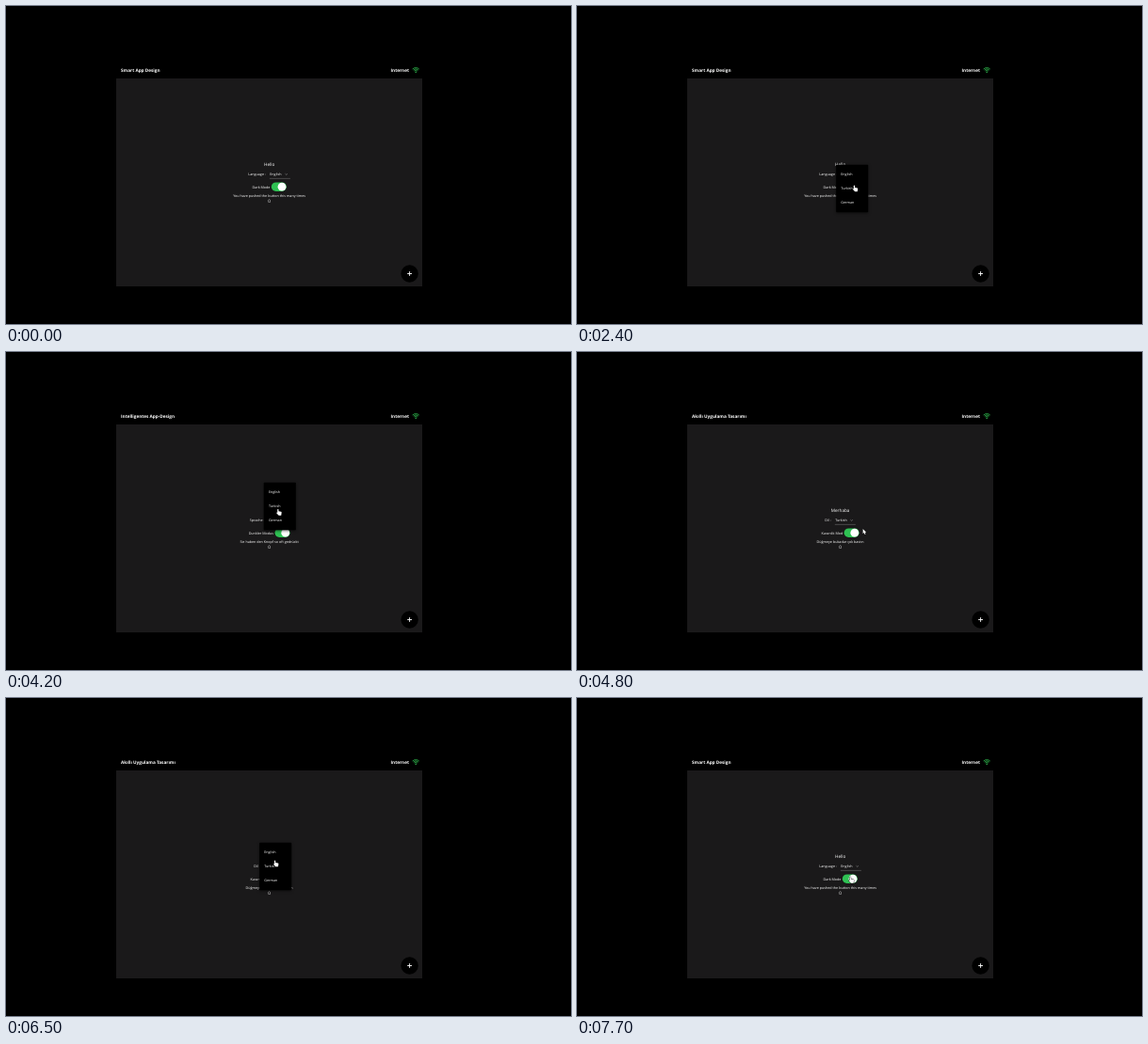
Animation of 600 by 338 pixels, one loop 8 s. Source, as an HTML page with a canvas:

```html
<!DOCTYPE html>
<html lang="en">
<head>
<meta charset="utf-8">
<title>Language menu</title>
<style>
  html, body { margin: 0; width: 100%; height: 100%; overflow: hidden; background: #000; }
  canvas { display: block; }
</style>
</head>
<body>
<canvas id="stage" width="600" height="338"></canvas>
<script>
const ctx = document.getElementById('stage').getContext('2d');
const LOOP = 8000, STEP = 100, CENTER = 279.6;
const SMALL = 3.7, LARGE = 4.7;
const FONT = '"Open Sans", "Noto Sans", sans-serif';
const LANGUAGES = ['English', 'Turkish', 'German'];

const STRINGS = [
  { title: 'Smart App Design', hello: 'Hello', language: 'Language :', dark: 'Dark Mode',
    pushed: 'You have pushed the button this many times' },
  { title: 'Akıllı Uygulama Tasarımı', hello: 'Merhaba', language: 'Dil :', dark: 'Karanlık Mod',
    pushed: 'Düğmeye bukadar çok bastın' },
  { title: 'Intelligentes App-Design', hello: 'Hallo', language: 'Sprache :', dark: 'Dunkler Modus',
    pushed: 'Sie haben den Knopf so oft gedrückt' },
];

// Each visit to the menu: opened, item picked, language before and after.
const PICKS = [
  { open: 1900, pick: 3000, from: 0, to: 2 },
  { open: 3700, pick: 4500, from: 2, to: 1 },
  { open: 6200, pick: 6700, from: 1, to: 0 },
];

// Pointer tip: time, x, y
const POINTER = [
  [1000, 331, 61], [1200, 312, 130], [1400, 290, 190], [1600, 291.5, 180.5], [1900, 291.5, 181],
  [2100, 292, 183], [2400, 293.8, 190.5], [2700, 293.8, 190.5], [2900, 291, 206], [3100, 291, 206],
  [3500, 289, 178.3], [3900, 289, 178.3], [4300, 288, 163], [4500, 288, 163], [4800, 303.6, 188],
  [5400, 303.6, 188], [5700, 295, 190], [6000, 287, 180], [6300, 287, 180], [6500, 285, 172.5],
  [6600, 283, 163], [6700, 283, 163], [7000, 301.5, 205], [7200, 301.5, 206], [7700, 289.6, 190],
];
const HAND_TIMES = [[1400, 4700], [5700, 6800], [7500, LOOP]];

const clamp = v => Math.min(1, Math.max(0, v));
const mix = (a, b, p) => a + (b - a) * p;

function setFont(size, weight = 400) {
  ctx.font = `${weight} ${size}px ${FONT}`;
  ctx.textRendering = 'geometricPrecision';
}

function textWidth(text, size) {
  setFont(size);
  return ctx.measureText(text).width;
}

// y is the middle of the capitals
function write(text, x, y, size, { align = 'left', weight = 400 } = {}) {
  setFont(size, weight);
  ctx.textAlign = align;
  ctx.fillStyle = '#fff';
  ctx.fillText(text, x, y + size * 0.36);
}

function fillRound(x, y, w, h, r, color) {
  ctx.fillStyle = color;
  ctx.beginPath();
  ctx.roundRect(x, y, w, h, r);
  ctx.fill();
}

function disc(x, y, r, color) {
  ctx.fillStyle = color;
  ctx.beginPath();
  ctx.arc(x, y, r, 0, Math.PI * 2);
  ctx.fill();
}

function line(points, color, width) {
  ctx.strokeStyle = color;
  ctx.lineWidth = width;
  ctx.beginPath();
  points.forEach(([x, y]) => ctx.lineTo(x, y));
  ctx.stroke();
}

function drawWifi(x, y) {
  ctx.strokeStyle = '#2fb94f';
  ctx.lineWidth = 0.8;
  for (const r of [2.2, 3.6, 5]) {
    ctx.beginPath();
    ctx.arc(x, y, r, -Math.PI * 0.75, -Math.PI * 0.25);
    ctx.stroke();
  }
  disc(x, y - 0.4, 0.8, '#2fb94f');
}

function drawFrame(title) {
  ctx.fillStyle = '#000';
  ctx.fillRect(0, 0, 600, 338);
  ctx.fillStyle = '#1a191a';
  ctx.fillRect(117, 77, 325, 221);
  write(title, 122, 68.4, LARGE, { weight: 700 });
  write('Internet', 428, 68.4, LARGE, { weight: 700, align: 'right' });
  drawWifi(435.2, 70.6);
  disc(428.6, 284.5, 9.2, '#000');
  line([[426.2, 284.5], [431, 284.5]], '#fff', 0.9);
  line([[428.6, 282.1], [428.6, 286.9]], '#fff', 0.9);
}

// Left edge of the drop-down, which follows the width of its label
const dropdownX = lang => CENTER + (textWidth(STRINGS[lang].language, SMALL) + 4 - 22) / 2;

function drawContent(lang) {
  const s = STRINGS[lang], centered = { align: 'center' };
  write(s.hello, CENTER, 168.2, LARGE, centered);

  const x = dropdownX(lang);
  write(s.language, x - 4, 179, SMALL, { align: 'right' });
  write(LANGUAGES[lang], x + 0.4, 179, SMALL);
  line([[x + 16.6, 178.3], [x + 17.8, 179.4], [x + 19, 178.3]], '#aaa', 0.5);
  line([[x, 183.4], [x + 22, 183.4]], '#777', 0.5);

  const labelWidth = textWidth(s.dark, SMALL);
  const left = CENTER - (labelWidth + 1.4 + 16) / 2, knob = left + labelWidth + 1.4;
  write(s.dark, left, 192.2, SMALL);
  fillRound(knob, 187.4, 16, 9.6, 4.8, '#2fc153');
  disc(knob + 11.2, 192.2, 4.4, '#fff');

  write(s.pushed, CENTER, 201.2, SMALL, centered);
  write('0', CENTER, 207.5, LARGE, centered);
}

// The panel grows out of the selected item, and fades away once an item is picked.
function drawMenu({ open, pick, from }, t) {
  const alpha = t < pick ? clamp((t - open + STEP) / 200) : 1 - clamp((t - pick + STEP) / 300);
  if (t < open || alpha <= 0) return;
  const grow = clamp((t - open) / 200);
  const x = dropdownX(from) - 4.7, firstY = 179 - from * 15;
  const top = mix(171.5, firstY - 10.2, grow);
  const bottom = mix(186.5, firstY + 40.2, grow);

  ctx.save();
  ctx.globalAlpha = alpha;
  ctx.shadowColor = 'rgba(0,0,0,.5)';
  ctx.shadowBlur = 3;
  ctx.shadowOffsetY = 1;
  fillRound(x, top, 34, bottom - top, 0.6, '#000');
  ctx.shadowColor = 'transparent';
  ctx.beginPath();
  ctx.rect(x, top, 34, bottom - top);
  ctx.clip();
  ctx.globalAlpha = alpha * clamp((t - open + STEP) / 300);
  LANGUAGES.forEach((name, i) => write(name, x + 5.1, firstY + i * 15, SMALL));
  ctx.restore();
}

const ARROW = new Path2D('M0 0V5.2L1.2 4.1L2 6L3 5.6L2.2 3.8H3.8Z');
const HAND = new Path2D('M0 .5Q.6-.4 1.2 .5V2.4L3.9 3Q4.5 3.2 4.4 4L4 6.8H1.4L-1 4.3Q-1 3.4 0 4Z');

function drawPointer(t) {
  if (t < POINTER[0][0]) return;
  let i = POINTER.findIndex(p => p[0] > t);
  if (i < 0) i = POINTER.length - 1;
  const [t0, x0, y0] = POINTER[i - 1], [t1, x1, y1] = POINTER[i];
  const p = clamp((t - t0) / (t1 - t0));
  const shape = HAND_TIMES.some(([a, b]) => t >= a && t < b) ? HAND : ARROW;
  ctx.save();
  ctx.translate(mix(x0, x1, p), mix(y0, y1, p));
  ctx.strokeStyle = '#000';
  ctx.lineWidth = 0.8;
  ctx.stroke(shape);
  ctx.fillStyle = '#fff';
  ctx.fill(shape);
  ctx.restore();
}

function draw(now) {
  const t = Math.floor((now % LOOP) / STEP) * STEP;
  const lang = PICKS.reduce((current, p) => (t >= p.pick ? p.to : current), 0);
  drawFrame(STRINGS[lang].title);
  drawContent(lang);
  PICKS.forEach(p => drawMenu(p, t));
  drawPointer(t);
}

const start = performance.now();
function tick() {
  draw(performance.now() - start);
  requestAnimationFrame(tick);
}
tick();
</script>
</body>
</html>
```
